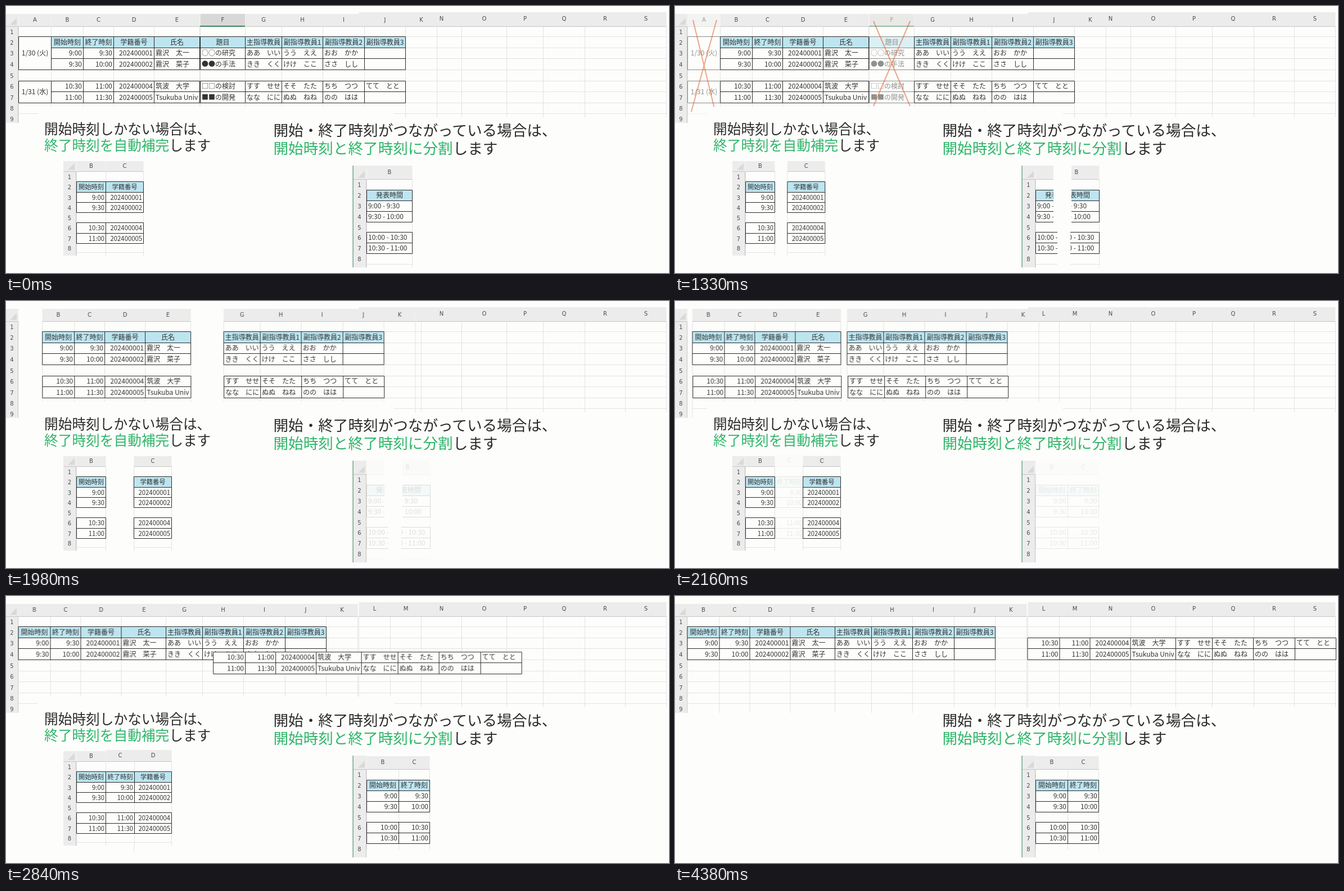
These frames come from a looping animation (1179 px wide and 475 px high, 4.4 s). An HTML page:

```html
<!DOCTYPE html>
<html lang="ja">
<head>
<meta charset="utf-8">
<title>Schedule table conversion</title>
<style>
html, body { margin: 0; width: 100%; height: 100%; overflow: hidden; background: #fdfdfb; }
svg { display: block; width: 1179px; height: 475px; }
text { font-family: "Noto Sans CJK JP", "Noto Sans CJK", "Noto Sans", sans-serif; font-size: 12px; fill: #333; }
.small text { font-size: 11.3px; }
.small .label, .label { font-family: "DejaVu Sans", sans-serif; font-size: 10px; fill: #4a4a4a; }
.title { font-weight: 300; fill: #2c2c2c; }
.title .key { fill: #2fb56a; }
.grid { stroke: #e3e3e6; fill: none; }
.edge { stroke: #c6c6c6; fill: none; }
.border { stroke: #2a2a2a; fill: none; }
.cross { stroke: #dc5f24; stroke-width: 2; fill: none; stroke-dasharray: 1 1; }

g, .cross {
  animation-duration: 4400ms;
  animation-timing-function: linear;
  animation-iteration-count: infinite;
}
.cross { animation-name: draw; }
.drop { animation-name: drop; }
.split { animation-name: split; }
.merged { animation-name: merged; }
.added { animation-name: added; }
.aside { animation-name: aside; }
.left, .lowLeft, .right, .lowRight { animation-name: shift; }
.left { --dx: -58.5px; }
.lowLeft { --dx: -57.5px; }
.right { --dx: -141px; }
.lowRight { --dx: -139px; }
.lift { animation-name: lift; }
.note { animation-name: note; }

@keyframes draw { 0%, 12.5% { stroke-dashoffset: 1; } 23.86%, 100% { stroke-dashoffset: 0; } }
@keyframes drop { 0%, 25% { opacity: 1; } 36.36%, 100% { opacity: 0; } }
@keyframes split {
  0%, 12.5% { transform: translateX(0); animation-timing-function: cubic-bezier(.455, .03, .515, .955); }
  23.86%, 100% { transform: translateX(32px); }
}
@keyframes merged { 0%, 35.45% { opacity: 1; } 46.82%, 100% { opacity: 0; } }
@keyframes added { 0%, 47.95% { opacity: 0; } 59.32%, 100% { opacity: 1; } }
@keyframes aside {
  0%, 25% { transform: translateX(0); animation-timing-function: cubic-bezier(.455, .03, .515, .955); }
  36.36%, 100% { transform: translateX(50px); }
}
@keyframes shift {
  0%, 40.93% { transform: translateX(0); animation-timing-function: cubic-bezier(.455, .03, .515, .955); }
  52.3%, 100% { transform: translateX(var(--dx)); }
}
@keyframes lift {
  0%, 58.52% { transform: translate(0, 0); animation-timing-function: cubic-bezier(.455, .03, .515, .955); }
  69.89%, 100% { transform: translate(604px, -59px); }
}
@keyframes note { 0%, 98.86% { visibility: visible; } 98.87%, 100% { visibility: hidden; } }
</style>
</head>
<body>
<svg id="stage" viewBox="0 0 1179 475" xmlns="http://www.w3.org/2000/svg"></svg>
<script>
const PAPER = '#fdfdfb', HEAD = '#ececec', CYAN = '#bde5f0';

const rect = (x, y, w, h, fill) => `<rect x="${x}" y="${y}" width="${w}" height="${h}" fill="${fill}"/>`;
const path = (d, cls) => `<path class="${cls}" d="${d}"/>`;
const text = (x, y, s, anchor = 'middle', cls = '') =>
  `<text class="${cls}" x="${x}" y="${y}" text-anchor="${anchor}">${s}</text>`;
const group = (cls, ...parts) => `<g class="${cls}">${parts.join('')}</g>`;
const mid = (list, i) => (list[i] + list[i + 1]) / 2;
const last = list => list[list.length - 1];

// Column headers and gridlines of a piece of sheet
function sheet(xs, labels, ys, top, bottom, fill = HEAD) {
  const x0 = xs[0], x1 = last(xs), w = x1 - x0;
  const lines = xs.map(x => `M${x} ${ys[0]}V${bottom}`).join('') +
    ys.slice(1).filter(y => y < bottom).map(y => `M${x0} ${y}H${x1}`).join('');
  return rect(x0, top, w, bottom - top, PAPER) + rect(x0, top, w, ys[0] - top, fill) +
    path(lines, 'grid') + path(`M${x0} ${ys[0]}H${x1}`, 'edge') +
    labels.map((s, i) => text(mid(xs, i), (top + ys[0]) / 2 + 2.5, s, 'middle', 'label')).join('');
}

function rowHead(x0, x1, ys, top, bottom) {
  const y = ys[0];
  return rect(x0, top, x1 - x0, bottom - top, HEAD) +
    `<path fill="#d9d9d9" d="M${x1 - 3} ${y - 15}V${y - 3}H${x1 - 15}Z"/>` +
    path(`M${x1 - .5} ${y}V${bottom}M${x0} ${y}H${x1}`, 'edge') +
    ys.slice(1).map((_, i) =>
      text((x0 + x1) / 2 - .5, Math.min(mid(ys, i), bottom - 7) + 4, i + 1, 'middle', 'label')).join('');
}

// Times and numbers go right, dates go to the middle, the rest left
function cell(x0, x1, y, s, head) {
  if (head || s.includes('(')) return text((x0 + x1) / 2, y, s);
  return /^[\d:]+$/.test(s) ? text(x1 - 2.5, y, s, 'end') : text(x0 + 2.5, y, s, 'start');
}

function table(xs, ys, rows, head = false) {
  const x0 = xs[0], x1 = last(xs), y0 = ys[0], y1 = last(ys);
  return rect(x0, y0, x1 - x0, y1 - y0, PAPER) +
    (head ? rect(x0, y0, x1 - x0, ys[1] - y0, CYAN) : '') +
    path(xs.map(x => `M${x} ${y0}V${y1}`).join('') + ys.map(y => `M${x0} ${y}H${x1}`).join(''), 'border') +
    rows.map((row, r) => row.split('|').map((s, c) =>
      cell(xs[c], xs[c + 1], mid(ys, r) + 4.4, s, head && !r)).join('')).join('');
}

// A piece of sheet with a headed block in rows 2-4 and a block in rows 6-7
const piece = (xs, labels, ys, top, bottom, upper, lower) =>
  sheet(xs, labels, ys, top, bottom) + table(xs, ys.slice(1, 5), upper, true) + table(xs, ys.slice(5, 8), lower);

const title = (x, y, step, size, first, key) => {
  const line = (dy, s) => `<text class="title" style="font-size:${size}px" x="${x}" y="${y + dy}">${s}</text>`;
  return line(0, first) + line(step, `<tspan class="key">${key}</tspan>します`);
};

const cross = (x0, y0, x1, y1, x2, y2, x3) =>
  `<path class="cross" pathLength="1" d="M${x0} ${y0}L${x1} ${y1}"/>` +
  `<path class="cross" pathLength="1" d="M${x2} ${y0}L${x3} ${y2}"/>`;

// Main sheet
const Y = [36.5, 54.5, 74.5, 93.5, 113.5, 133.5, 152.5, 172.5, 191.5, 210.5];
const upperY = Y.slice(1, 5), lowerY = Y.slice(5, 8);
const leftX = [80.5, 137.5, 191.5, 263.5, 344.5], rightX = [425.5, 490.5, 563.5, 637.5, 710.5];
const dayX = [22.5, 80.5], topicX = [345.5, 425.5];

const main = [
  sheet([627.5, 683.5, 738.5, 810.5, 890.5, 955.5, 1029.5, 1101.5, 1174.5], [...'LMNOPQRS'], Y, 11, 198),
  rowHead(0, 22, Y, 14, 208),
  group('drop',
    sheet(dayX, ['A'], Y, 14, 208),
    table(dayX, [54.5, 113.5], ['1/30 (火)']),
    table(dayX, [133.5, 172.5], ['1/31 (水)']),
    sheet(topicX, ['F'], Y, 14, 208, '#d8d8d8'),
    rect(345, 35, 80, 2, '#3b8560'),
    table(topicX, upperY, ['題目', '○○の研究', '●●の手法'], true),
    table(topicX, lowerY, ['□□の検討', '■■の開発'])),
  group('left',
    sheet(leftX, [...'BCDE'], Y, 14, 208),
    table(leftX, upperY, ['開始時刻|終了時刻|学籍番号|氏名',
      '9:00|9:30|202400001|霧沢　太一', '9:30|10:00|202400002|霧沢　菜子'], true)),
  group('right',
    sheet([...rightX, 766.5], [...'GHIJK'], Y, 14, 208),
    table(rightX, upperY, ['主指導教員|副指導教員1|副指導教員2|副指導教員3',
      'ああ　いい|うう　ええ|おお　かか|', 'きき　くく|けけ　ここ|ささ　しし|'], true)),
  group('lift',
    group('lowLeft', table(leftX, lowerY,
      ['10:30|11:00|202400004|筑波　大学', '11:00|11:30|202400005|Tsukuba Univ'])),
    group('lowRight', table(rightX, lowerY,
      ['すす　せせ|そそ　たた|ちち　つつ|てて　とと', 'なな　にに|ぬぬ　ねね|のの　はは|']))),
  group('drop',
    cross(32, 25, 70, 182, 74, 188, 29),
    cross(353, 27, 418, 178, 418, 178, 353))
];

// Start times only: the end time column is filled in
const SY = [294.5, 312.5, 331.5, 349.5, 367.5, 385.5, 404.5, 422.5, 438.5];
const small = [
  rect(57, 179, 633, 90, PAPER),
  title(68, 227.5, 29, 24.7, '開始時刻しかない場合は、', '終了時刻を自動補完'),
  group('small',
    rowHead(102, 125, SY, 276, 444),
    piece([125.5, 177.5], ['B'], SY, 276, 444, ['開始時刻', '9:00', '9:30'], ['10:30', '11:00']),
    group('aside', piece([177.5, 244.5], ['C'], SY, 276, 444,
      ['学籍番号', '202400001', '202400002'], ['202400004', '202400005'])),
    group('added',
      piece([177.5, 228.5, 294.5], ['C', 'D'], SY, 274, 444,
        ['終了時刻|学籍番号', '9:30|202400001', '10:00|202400002'],
        ['11:00|202400004', '11:30|202400005']),
      path('M227.5 444V456', 'grid')))
];

// Joined times: the column is cut in two
const BY = [308.5, 327.5, 346.5, 365.5, 384.5, 402.5, 421.5, 440.5, 459.5];
const joined = piece([641.5, 722.5], ['B'], BY, 284, 465,
  ['発表時間', '9:00 - 9:30', '9:30 - 10:00'], ['10:00 - 10:30', '10:30 - 11:00']);
const large = [
  rect(425, 199, 560, 70, PAPER),
  title(475.5, 231, 31.5, 26.6, '開始・終了時刻がつながっている場合は、', '開始時刻と終了時刻に分割'),
  '<defs><clipPath id="cutL"><path d="M641 284H673V395H680V466H641Z"/></clipPath>',
  '<clipPath id="cutR"><path d="M673 284H724V466H671V395H673Z"/></clipPath></defs>',
  rowHead(617, 641, BY, 284, 465),
  rect(616.5, 284, 1.2, 181, '#4c9470'),
  group('merged',
    `<g clip-path="url(#cutL)">${joined}</g>`,
    group('split', `<g clip-path="url(#cutR)">${joined}</g>`)),
  group('added', piece([641.5, 698.5, 753.5], ['B', 'C'], BY, 285, 451,
    ['開始時刻|終了時刻', '9:00|9:30', '9:30|10:00'], ['10:00|10:30', '10:30|11:00']))
];

document.getElementById('stage').innerHTML = main.join('') + group('note', ...small) + large.join('');
</script>
</body>
</html>
```
